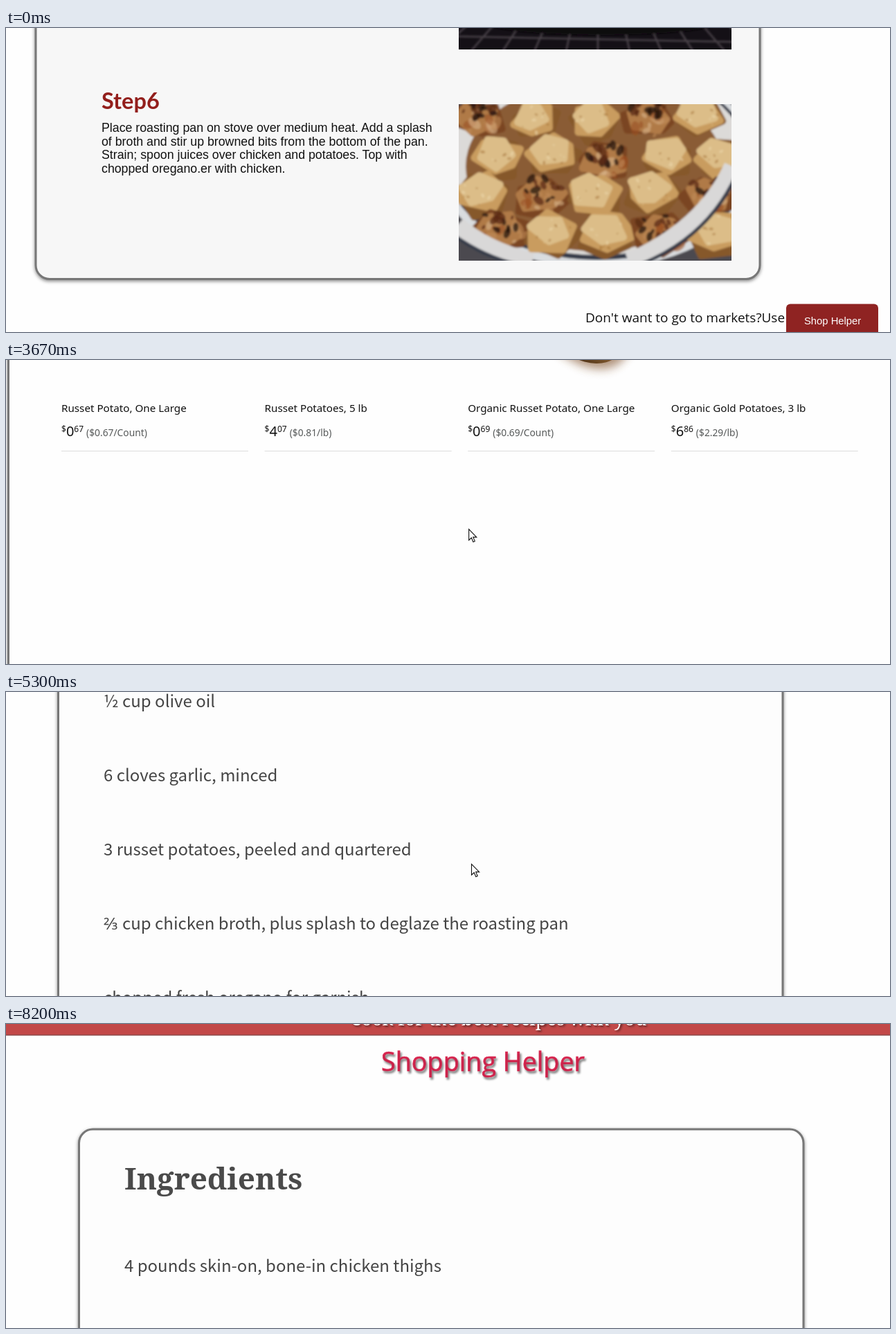
An HTML page that plays this animation: 1277 px wide and 439 px high, repeating every 8980 ms.

```html
<!DOCTYPE html>
<html lang="en">
<head>
<meta charset="utf-8">
<title>Shopping Helper</title>
<style>
html, body { margin: 0; width: 100%; height: 100%; overflow: hidden; background: #fefefe; }
svg { display: block; width: 100vw; height: 100vh; }
text { white-space: pre; }
.panel { stroke: #777; stroke-width: 3; filter: drop-shadow(0 2px 2.5px rgba(0,0,0,.45)); }
.title { font: bold 44px "Noto Serif", serif; fill: #4a4a4a; }
.item { font: 24px "Noto Sans CJK SC", "Noto Sans CJK JP", "Noto Sans CJK", "Noto Sans", sans-serif; fill: #444; }
.arial { font-family: "Liberation Sans", Arial, sans-serif; }
.card { font: 15.2px "Noto Sans", sans-serif; fill: #111; }
.open { font-family: "Open Sans", "Noto Sans", sans-serif; }
.pack { font-family: Lato, sans-serif; font-weight: bold; text-anchor: middle; }
</style>
</head>
<body>
<svg id="stage" viewBox="0 0 1277 439">
  <defs>
    <linearGradient id="raw" x1="0" y1="0" x2=".3" y2="1">
      <stop offset="0" stop-color="#d6b6a2"/><stop offset=".6" stop-color="#d0a491"/><stop offset="1" stop-color="#b07a6b"/>
    </linearGradient>
    <linearGradient id="breast" x1="0" y1="0" x2=".4" y2="1">
      <stop offset="0" stop-color="#d09886"/><stop offset="1" stop-color="#b97a69"/>
    </linearGradient>
    <linearGradient id="russet" x1="0" y1="0" x2=".3" y2="1">
      <stop offset="0" stop-color="#b98a55"/><stop offset=".6" stop-color="#a4733f"/><stop offset="1" stop-color="#4e3216"/>
    </linearGradient>
    <filter id="soft" x="-30%" y="-30%" width="160%" height="160%"><feGaussianBlur stdDeviation="7"/></filter>
    <filter id="blur"><feGaussianBlur stdDeviation="1.6"/></filter>
    <clipPath id="photo"><rect x="654" y="110" width="394" height="226"/></clipPath>
    <clipPath id="grill"><rect x="654" y="-10" width="394" height="41"/></clipPath>
    <clipPath id="tray"><rect x="969" y="267" width="264" height="139" rx="9"/></clipPath>
  </defs>
  <g id="recipe"></g>
  <g id="shop"></g>
  <circle id="click" cx="1183.5" cy="411.5" r="14" fill="#ffff00" fill-opacity=".47"/>
  <path id="cursor" d="M.5.5V16.2L4.2 12.8 6.8 18.8 9.2 17.7 6.7 11.9H11.6Z" fill="#fff" stroke="#111" stroke-width="1.1"/>
</svg>
<script>
const LOOP = 8980;
const $ = id => document.getElementById(id);

function random(seed) {
  return () => (seed = (seed * 16807) % 2147483647) / 2147483647;
}

const repeat = (n, fn) => Array.from({ length: n }, (_, i) => fn(i)).join('');
const text = (x, y, s, attrs = '') => `<text x="${x}" y="${y}" ${attrs}>${s}</text>`;
const path = (d, fill, attrs = '') => `<path d="${d}" fill="${fill}" ${attrs}/>`;
const line = (d, color, attrs = '') => path(d, 'none', `stroke="${color}" ${attrs}`);
const oval = (x, y, rx, ry, fill, a = 0, attrs = '') =>
  `<ellipse transform="translate(${x} ${y}) rotate(${a})" rx="${rx}" ry="${ry}" fill="${fill}" ${attrs}/>`;

// Scatter small ovals inside an ellipse
function specks(n, seed, x, y, rx, ry, size, colors, opacity = .6) {
  const rnd = random(seed);
  return repeat(n, i => {
    const a = rnd() * 6.283, d = Math.sqrt(rnd()), s = size * (.4 + rnd());
    return oval(x + Math.cos(a) * d * rx, y + Math.sin(a) * d * ry, s, s * .6,
      colors[i % colors.length], rnd() * 180, `opacity="${opacity}"`);
  });
}

// Irregular piece with rounded corners
function chunk(rnd, x, y, r, fill) {
  const turn = rnd() * 6.283;
  const points = Array.from({ length: 5 }, (_, i) => {
    const a = turn + (i + rnd() * .5) * 1.257, d = r * (.75 + rnd() * .3);
    return `${x + Math.cos(a) * d * 1.15} ${y + Math.sin(a) * d * .85}`;
  });
  return path(`M${points.join('L')}Z`, fill, `stroke="${fill}" stroke-width="10" stroke-linejoin="round"`);
}

function piece(rnd, x, y, r, roasted) {
  const seed = Math.floor(x * y);
  if (!roasted) {
    return chunk(rnd, x + 2, y + 5, r, '#86582a') + chunk(rnd, x, y, r * .9, '#c99c5e') +
      chunk(rnd, x - 3, y - 5, r * .7, '#dcbd88') + specks(8, seed, x, y, r * .8, r * .6, 2.5, ['#a77538', '#ecd9ae']);
  }
  return chunk(rnd, x, y + 4, r, '#7a4520') + chunk(rnd, x - 2, y + 2, r * .8, '#b07a46') +
    specks(12, seed, x + 4, y + 8, r * .8, r * .6, 8, ['#d8b48a', '#9a4f22', '#c08a58']) +
    specks(14, seed + 1, x, y - 8, r * .8, r * .5, 7, ['#25150e', '#5a2a14'], .75);
}

function dish() {
  const rnd = random(77);
  const food = repeat(4, row => repeat(5, col =>
    piece(rnd, 682 + col * 80 + (row % 2) * 22 + rnd() * 12, 126 + row * 54 + rnd() * 10, 33 + row * 2, (row + col) % 3 === 0)));
  return `<g clip-path="url(#photo)"><g filter="url(#blur)">
    <rect x="640" y="96" width="422" height="254" fill="#4b4a50"/>
    ${oval(855, 195, 232, 152, '#d9dcdf')}${oval(855, 192, 222, 143, '#343a49')}
    ${oval(855, 190, 216, 138, '#dcdad8')}${oval(850, 200, 186, 122, '#8a5c34')}
    ${food}
    ${line('M1050 200Q1010 290 900 338M652 285Q690 320 760 338', '#d9d8d8', 'stroke-width="26"')}
    ${line('M1056 210Q1016 300 920 340M648 300Q690 330 740 342', '#343a49', 'stroke-width="5"')}
  </g></g>`;
}

function grill() {
  const bars = repeat(11, i => `M${625 + i * 46} 34L${675 + i * 36} -12`);
  return `<g clip-path="url(#grill)"><rect x="654" y="-10" width="394" height="41" fill="#141016"/>
    <g filter="url(#blur)">${line(bars + 'M650 12L1050 20', '#4a4248', 'stroke-width="2.5"')}${oval(860, -8, 170, 18, '#0a070a')}</g></g>`;
}

function recipePage() {
  const lines = [
    'Place roasting pan on stove over medium heat. Add a splash',
    'of broth and stir up browned bits from the bottom of the pan.',
    'Strain; spoon juices over chicken and potatoes. Top with',
    'chopped oregano.er with chicken.'
  ];
  return `<rect class="panel" x="43" y="-60" width="1046" height="422.5" rx="20" fill="#f7f7f7"/>
    ${text(138, 117, 'Step6', 'font-family="Lato, sans-serif" font-weight="bold" font-size="32.5" fill="#931f1c"')}
    ${lines.map((s, i) => text(138, 150 + i * 19.7, s, 'class="arial" font-size="17.76" fill="#111"')).join('')}
    ${grill()}${dish()}
    ${text(837, 425, "Don't want to go to markets?Use", 'class="open" font-size="19" fill="#111"')}
    <rect x="1127" y="398.5" width="133" height="60" rx="6" fill="#8f2322"/>
    ${text(1153, 428, 'Shop Helper', 'class="arial" font-size="14.8" fill="#fff"')}`;
}

function card(i, name, price, unit) {
  const x = 80 + 293.6 * i, [whole, cents] = price.split('.');
  return text(x, 75, name, 'class="card"') +
    text(x, 104, `<tspan font-size="12">$</tspan><tspan font-size="20" dy="6">${whole}</tspan>` +
      `<tspan font-size="12" dy="-6">${cents}</tspan><tspan font-size="13.8" dx="4" dy="6" fill="#565959">(${unit})</tspan>`, 'class="card"') +
    line(`M${x} 131.5h270`, '#ddd');
}

const cards = list => list.map((c, i) => card(i, ...c)).join('');

function thighs() {
  const rnd = random(19);
  return repeat(7, i => {
    const x = 118 + i * 34, y = 332 + rnd() * 8;
    return oval(x - 6, y + 22, 18, 15, '#bb8474', i * 25) + oval(x, y, 20, 30, 'url(#raw)', 20 - i * 6);
  }) + specks(60, 13, 220, 342, 118, 26, 6, ['#e6d3c1', '#b67869', '#cda48f'], .5);
}

function wholeBird() {
  const claims = ['NO ANTIBIOTICS–EVER', 'VEGETABLE &amp; GRAIN FED', 'NO ADDED HORMONES', 'ALL NATURAL', 'GLUTEN FREE'];
  return path('M450 211Q520 201 588 208L594 236Q622 290 620 360V445H403Q400 375 409 300 413 262 450 236Z', '#cfb5a8') +
    path('M566 234L600 240 606 275Z', '#a87565') +
    specks(36, 19, 606, 350, 12, 95, 9, ['#c29382', '#e0d2c8']) +
    specks(30, 23, 414, 370, 9, 80, 8, ['#c69885', '#dccbc0']) +
    path('M450 213Q500 203 548 206L562 240Q600 270 602 310L612 445H428L419 330Q424 268 452 240Z', '#e0dfe1') +
    specks(26, 53, 515, 226, 46, 14, 12, ['#c9c8cc', '#f0f0f2'], .7) +
    specks(20, 59, 512, 320, 74, 60, 16, ['#d6d5d8', '#ebebed'], .6) +
    line('M422 400Q416 290 470 245M424 284H598M610 430Q610 280 562 242', '#79ad5c', 'stroke-width="1.6"') +
    text(494, 272, 'NORV', 'class="pack" font-size="29" fill="#5f9c3d"') +
    '<circle cx="549" cy="262" r="11" fill="#5f9c3d"/>' +
    claims.map((s, i) => text(510, 303 + i * 8.8, s, 'class="pack" font-size="8" fill="#4f8f37"')).join('') +
    line('M440 346H585M446 351H580', '#bfd2b4', 'stroke-width="1.5" stroke-dasharray="7 2"') +
    path('M427 358Q520 355 613 362V400Q520 395 426 397Z', '#c84a28') +
    text(510, 379, 'Y<tspan font-size="14.5">OUNG</tspan> C<tspan font-size="14.5">HICKEN</tspan>', 'class="pack" font-size="19.5" fill="#f6eeee"') +
    text(509, 391, 'WITHOUT GIBLETS &amp; NECK', 'class="pack" font-size="10.2" style="font-weight:400" fill="#f6cfc2"') +
    '<circle cx="509" cy="422" r="14" fill="#777"/>' +
    line('M434 401h26M560 401h24', '#888', 'stroke-width="2" stroke-dasharray="5 1"');
}

const breasts = () =>
  path('M674 390Q672 368 690 352 708 338 740 334 775 323 803 326 804 338 774 372 758 394 732 400 690 408 674 390Z', 'url(#breast)') +
  path('M806 318Q814 304 836 296 852 274 872 271 890 272 902 284 928 284 938 298 934 312 910 316 886 324 866 340 842 352 822 345 805 338 806 318Z', 'url(#breast)') +
  specks(20, 61, 735, 366, 45, 22, 9, ['#d8a999', '#bd7f6e'], .3) + specks(20, 67, 868, 310, 45, 22, 9, ['#d8a999', '#bd7f6e'], .3);

function wings() {
  const rnd = random(83), tones = ['#c78375', '#ebdfd8', '#d9b3a5', '#b86a5c', '#f2ebe7'];
  const meat = repeat(44, i => chunk(rnd, 975 + rnd() * 255, 270 + rnd() * 135, 8 + rnd() * 14, tones[i % 5]));
  const label = (y, s, size) => text(0, y, s, `class="pack" font-size="${size}" fill="#333"`);
  return `<g clip-path="url(#tray)"><rect x="960" y="260" width="280" height="150" fill="#dcbfb4"/>
      <g filter="url(#blur)" opacity=".9">${meat}</g></g>` +
    path('M1052 268H1163V277H1052Z', '#e9e9e9', 'stroke="#555"') +
    path('M1044 312h14v18h-14Z', '#4a6b3c') +
    path('M1059 277L1173 291 1153 405 1034 381Z', '#fafafa') +
    '<rect x="1090" y="288" width="30" height="13" fill="#4b9a45"/>' +
    `<g transform="translate(1104 316) rotate(7)">${label(0, 'Fresh Organic', 7.5)}${label(9, 'Chicken Wings', 7.5)}
      ${label(18, 'Item 105', 5)}${label(25, 'Sell or Freeze By', 5.2)}</g>` +
    '<circle cx="1067" cy="361" r="9" fill="#d5d5d5"/>' +
    path('M1086 371L1150 377 1148 404 1082 392Z', '#f4f4f4', 'stroke="#777" stroke-width=".8"') +
    line(repeat(3, i => `M${1090 - i} ${377 + i * 6}l54 6`), '#999', 'stroke-width="1.6"') +
    line('M1038 371L1078 381', '#333', 'stroke-width="3" stroke-dasharray="13 2"') +
    path('M1147 380l18-4-4 18h-16Z', '#444f45');
}

const sack = (x, fill) =>
  `<rect x="${x - 95}" y="-225" width="190" height="220" rx="24" fill="${fill}"/>` +
  specks(30, x, x, -90, 72, 62, 20, ['#b78b55', '#caa268', '#a5763f'], .9) +
  `<rect x="${x - 75}" y="-201" width="150" height="46" rx="6" fill="#f3eee2"/>`;

const potato = (x, y, rx, ry, a) =>
  oval(x + 5, y + 8, rx, ry, '#7a4a20', a, 'filter="url(#soft)" opacity=".6"') + oval(x, y, rx, ry, 'url(#russet)', a) +
  specks(24, 41, x, y, 50, 45, 3, ['#7b5128', '#c49a63']);

function potatoRow() {
  return potato(215, -110, 118, 68, -12) + sack(508, '#c9ad7c') + potato(808, -105, 125, 70, 55) + sack(1095, '#d9bd62') +
    cards([
      ['Russet Potato, One Large', '0.67', '$0.67/Count'], ['Russet Potatoes, 5 lb', '4.07', '$0.81/lb'],
      ['Organic Russet Potato, One Large', '0.69', '$0.69/Count'], ['Organic Gold Potatoes, 3 lb', '6.86', '$2.29/lb']
    ]);
}

function shopPage() {
  const items = [
    '4 pounds skin-on, bone-in chicken thighs', '1 tablespoon kosher salt', '1 tablespoon dried oregano',
    '1 teaspoon ground black pepper', '1 teaspoon ground rosemary', '1 pinch cayenne pepper',
    '½ cup fresh lemon juice', '½ cup olive oil', '6 cloves garlic, minced',
    '3 russet potatoes, peeled and quartered',
    '⅔ cup chicken broth, plus splash to deglaze the roasting pan', 'chopped fresh oregano for garnish'
  ];
  return `<rect x="-60" y="-330" width="1400" height="132" fill="#c24848"/>${line('M-60 -198H1340', '#8d4a4a', 'stroke-width="1.5"')}
    ${text(467, -212, 'Cook for the best recipes with you', 'font-family="Noto Serif, serif" font-size="26.5" fill="#fff" style="text-shadow:2px 2px 3px #0008"')}
    ${text(512, -146, 'Shopping Helper', 'class="open" font-size="37.7" fill="#dc2852" stroke="#dc2852" stroke-width=".7" style="text-shadow:2px 3px 3px #0007"')}
    <rect class="panel" x="75.5" y="-62" width="1046.5" height="1467" rx="20" fill="#fdfdfd"/>
    ${text(141, 25, 'Ingredients', 'class="title"')}
    ${items.map((s, i) => text(141, 144 + i * 107, s, 'class="item"')).join('')}
    <g transform="translate(0 1470)">
      <rect class="panel" x="3.5" y="-30" width="1300" height="1388" rx="20" fill="#fefefe"/>
      ${text(75, 57, 'Search in Zomvar Fresh', 'class="title"')}
      ${thighs()}${wholeBird()}${breasts()}${wings()}
      <g transform="translate(0 453)">${cards([
        ['Boneless Chicken Thighs', '5.49', '$3.66/lb'], ['Whole Young Chicken', '8.92', '$1.98/lb'],
        ['Boneless Chicken Breasts', '6.38', '$4.25/lb'], ['Organic Chicken Wings', '7.14', '$4.76/lb']
      ])}</g>
    </g>
    <g transform="translate(0 2370)">${potatoRow()}</g>`;
}

// A position that moves in bursts of n held steps
class Track {
  constructor(x, y) { this.keys = [{ t: 0, x, y }]; }

  go(t0, t1, n, x, y, { power = 1, bendX = 0, bendY = 0 } = {}) {
    const from = this.keys[this.keys.length - 1];
    for (let i = 1; i <= n; i++) {
      const u = i / n, e = 1 - (1 - u) ** power, arc = i < n ? Math.sin(Math.PI * u) : 0;
      this.keys.push({
        t: t0 + (t1 - t0) * (i - 1) / Math.max(1, n - 1),
        x: from.x + (x - from.x) * e + bendX * arc,
        y: from.y + (y - from.y) * e + bendY * arc
      });
    }
    return this;
  }

  apply(id, t) {
    const { x, y } = this.keys.reduce((pose, k) => k.t <= t ? k : pose);
    $(id).setAttribute('transform', `translate(${x} ${y})`);
  }
}

const pointer = new Track(1146, 440)
  .go(70, 520, 7, 1182, 407, { bendX: -12, bendY: -32 })
  .go(690, 760, 2, 1184, 411)
  .go(1710, 2340, 9, 681, -20, { power: 1.5 })
  .go(3350, 3730, 6, 672, 248, { power: 2.34, bendX: -8 })
  .go(6430, 6590, 3, 669, -99)
  .go(7840, 7840, 1, 721, 21)
  .go(7910, 8200, 5, 1211, 526);

// Wheel scrolling, then the window is dragged
const wheel = { power: 2 };
const view = new Track(0, -2370)
  .go(3960, 4120, 3, 0, -2123, wheel)
  .go(4500, 4580, 2, 0, -1850, wheel)
  .go(4810, 4920, 2, 0, -1343, wheel)
  .go(5190, 5360, 3, 0, -812, wheel)
  .go(5650, 5740, 2, 0, -291, wheel)
  .go(5970, 5970, 1, 0, 0)
  .go(7030, 7535, 9, 30, 214, { power: 1.7, bendX: 17.9 });

const show = (id, on) => $(id).setAttribute('display', on ? 'inline' : 'none');

function draw(t) {
  show('recipe', t < 1400);
  show('shop', t >= 3350);
  show('click', t >= 1080 && t < 1250);
  view.apply('shop', t);
  pointer.apply('cursor', t);
}

$('recipe').innerHTML = recipePage();
$('shop').innerHTML = shopPage();

const start = performance.now();
function tick() {
  draw((performance.now() - start) % LOOP);
  requestAnimationFrame(tick);
}
draw(0);
requestAnimationFrame(tick);
</script>
</body>
</html>
```
